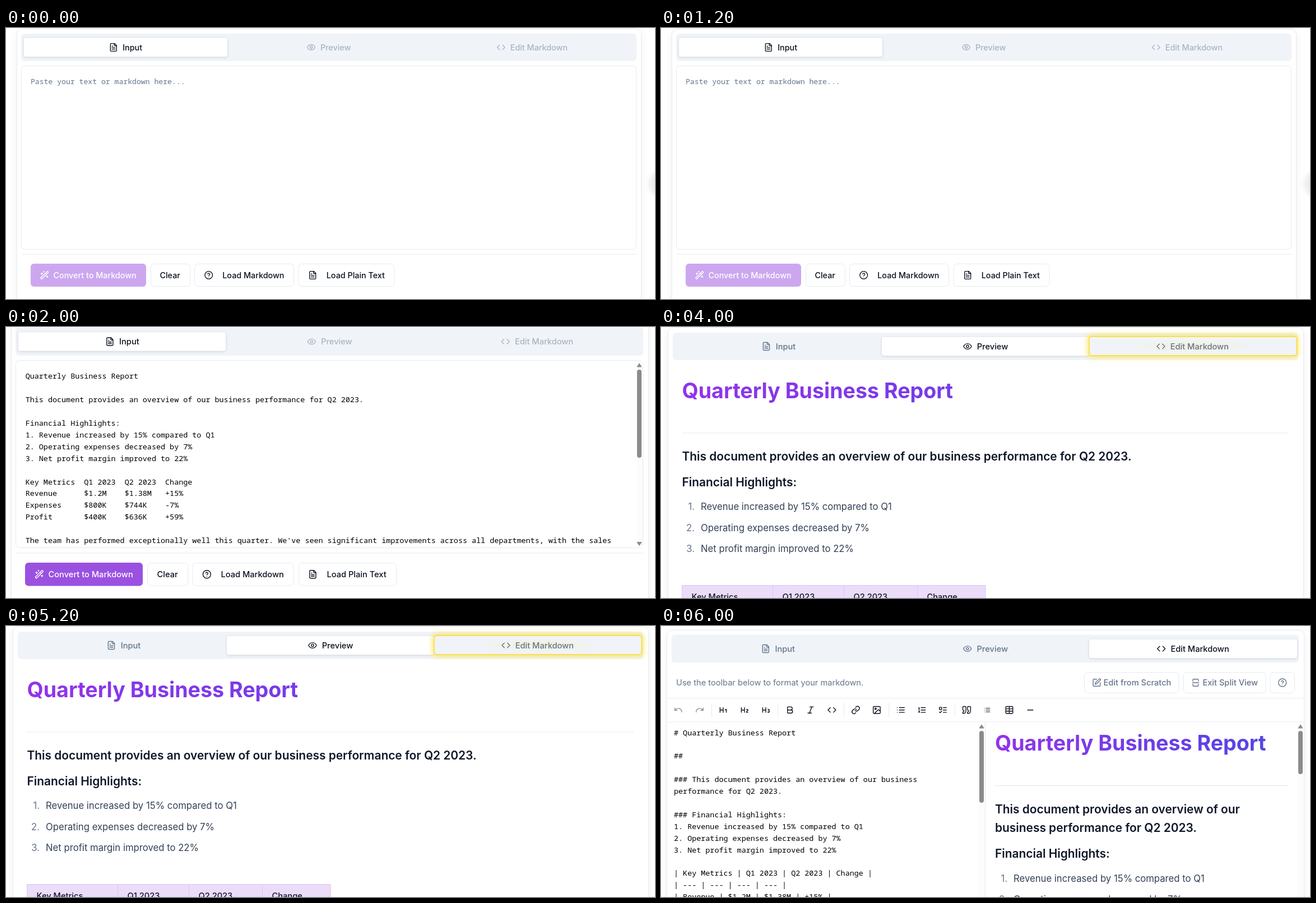
Write an HTML page that moves like this. It is 1158x483 px and loops after 8000 ms.

```html
<!DOCTYPE html>
<html lang="en">
<head>
<meta charset="utf-8">
<title>Markdown converter</title>
<style>
  html, body { margin: 0; width: 100%; height: 100%; overflow: hidden; background: #fff; }
  svg { display: block; }
  text { font-family: Inter, sans-serif; white-space: pre; }
  .mono { font-family: "Noto Sans Mono", monospace; }
  .icon { fill: none; stroke-width: 2; stroke-linecap: round; stroke-linejoin: round; }
  .card { filter: drop-shadow(0 4px 6px rgba(30, 41, 59, .07)); }
  .lift { filter: drop-shadow(0 1.5px 2px rgba(15, 23, 42, .16)); }
</style>
</head>
<body>
<svg id="stage" width="1158" height="483" viewBox="0 0 1158 483"></svg>
<script>
const INK = '#0b1120', HEAD = '#0f172a', BODY = '#334155', MUTED = '#64748b', LINE = '#e6ebf1', BAR = '#f0f4f9';

const circle = (x, y, r) => `M${x - r} ${y}a${r} ${r} 0 1 0 ${2 * r} 0a${r} ${r} 0 1 0 ${-2 * r} 0`;
const frame = 'M5 3h14a2 2 0 0 1 2 2v14a2 2 0 0 1-2 2H5a2 2 0 0 1-2-2V5a2 2 0 0 1 2-2z';
const ICONS = {
  file: 'M15 2H6a2 2 0 0 0-2 2v16a2 2 0 0 0 2 2h12a2 2 0 0 0 2-2V7zM14 2v4a2 2 0 0 0 2 2h4M10 9H8M16 13H8M16 17H8',
  eye: 'M2 12s3-7 10-7 10 7 10 7-3 7-10 7-10-7-10-7z' + circle(12, 12, 3),
  code: 'M16 18l6-6-6-6M8 6l-6 6 6 6',
  wand: 'M21.6 3.6l-1.2-1.2a1.2 1.2 0 0 0-1.8 0L2.4 18.6a1.2 1.2 0 0 0 0 1.8l1.2 1.2a1.2 1.2 0 0 0 1.8 0L21.6 5.4a1.2 1.2 0 0 0 0-1.8M14 7l3 3M5 6v4M19 14v4M10 2v2M7 8H3M21 16h-4M11 3H9',
  help: circle(12, 12, 10) + 'M9.1 9a3 3 0 0 1 5.8 1c0 2-3 3-3 3M12 17h.01',
  pen: 'M12 3H5a2 2 0 0 0-2 2v14a2 2 0 0 0 2 2h14a2 2 0 0 0 2-2v-7M18.4 2.6a1 1 0 0 1 3 3l-9 9a2 2 0 0 1-.9.5l-2.9.9a.5.5 0 0 1-.6-.6l.9-2.9a2 2 0 0 1 .5-.9z',
  split: 'M5 8V5c0-1 1-2 2-2h10c1 0 2 1 2 2v3M19 16v3c0 1-1 2-2 2H7c-1 0-2-1-2-2v-3M4 12h16',
  undo: 'M3 7v6h6M21 17a9 9 0 0 0-9-9 9 9 0 0 0-6 2.3L3 13',
  redo: 'M21 7v6h-6M3 17a9 9 0 0 1 9-9 9 9 0 0 1 6 2.3l3 2.7',
  h1: 'M4 12h8M4 18V6M12 18V6M17 12l3-2v8',
  h2: 'M4 12h8M4 18V6M12 18V6M21 18h-4c0-4 4-3 4-6 0-1.5-2-2.5-4-1',
  h3: 'M4 12h8M4 18V6M12 18V6M17.5 10.5c1.7-1 3.5 0 3.5 1.5a2 2 0 0 1-2 2M17 17.5c2 1.5 4 .3 4-1.5a2 2 0 0 0-2-2',
  bold: 'M6 12h9a4 4 0 0 1 0 8H7a1 1 0 0 1-1-1V5a1 1 0 0 1 1-1h7a4 4 0 0 1 0 8',
  italic: 'M19 4h-9M14 20H5M15 4L9 20',
  link: 'M10 13a5 5 0 0 0 7.5.5l3-3a5 5 0 0 0-7-7l-1.8 1.7M14 11a5 5 0 0 0-7.5-.5l-3 3a5 5 0 0 0 7 7l1.8-1.7',
  image: frame + circle(9, 9, 2) + 'M21 15l-3-3a2 2 0 0 0-3 0L6 21',
  list: 'M8 6h13M8 12h13M8 18h13M3 6h.01M3 12h.01M3 18h.01',
  ordered: 'M10 6h11M10 12h11M10 18h11M4 6h1v4M4 10h2M6 18H4c0-1 2-2 2-3s-1-1.5-2-1',
  todo: 'M4 5h4a1 1 0 0 1 1 1v4a1 1 0 0 1-1 1H4a1 1 0 0 1-1-1V6a1 1 0 0 1 1-1zM3 17l2 2 4-4M13 6h8M13 12h8M13 18h8',
  quote: [0, 12].map(x => `M${3 + x} 21c3 0 7-1 7-8V5c0-1.2-.8-2-2-2h-4c-1.2 0-2 .8-2 2v6c0 1.2.8 2 2 2 1 0 1 0 1 1v1c0 1-1 2-2 2s-1 0-1 1v2c0 1 0 1 1 1z`).join(''),
  table: frame + 'M12 3v18M3 9h18M3 15h18',
  minus: 'M5 12h14'
};

const rect = (x, y, x2, y2, fill, r = 0, more = '') =>
  `<rect x="${x}" y="${y}" width="${x2 - x}" height="${y2 - y}" rx="${r}" fill="${fill}" ${more}/>`;
const box = (x, y, x2, y2, r = 6) => rect(x, y, x2, y2, '#fff', r, `stroke="${LINE}"`);
const rule = (x, x2, y, color = LINE) => rect(x, y, x2, y + 1, color);
const text = (s, x, y, size, weight = 400, fill = INK, more = '') =>
  `<text x="${x}" y="${y}" font-size="${size}" font-weight="${weight}" fill="${fill}" ${more}>${s}</text>`;
const icon = (name, x, cy, size, color = INK) =>
  `<path class="icon" d="${ICONS[name]}" stroke="${color}" transform="translate(${x} ${cy - size / 2}) scale(${size / 24})"/>`;
const mono = (lines, x, y, color = '#000', size = 13.41) =>
  lines.map((s, i) => text(s, x, y + i * 20.9, size, 400, color, 'class="mono"')).join('');
const label = (name, s, x, cy, k, color, gap = 24, weight = 500) =>
  icon(name, x, cy, 16 * k, color) + text(s, x + gap * k, cy + 5.1 * k, 14 * k, weight, color);
const card = (x, y, x2) => rect(x, y, x2, 520, '#fff', 10, `class="card" stroke="${LINE}"`);

// Tab strip: xs are the icon positions, lit is the active tab, [a, b] its extent.
function tabs(x, x2, y, y2, xs, lit, a, b, k, dim = 1, under = '') {
  const names = [['file', 'Input'], ['eye', 'Preview'], ['code', 'Edit Markdown']];
  const cy = (y + y2) / 2;
  return rect(x, y, x2, y2, BAR, 6) + rect(a, cy - 16.7, b, cy + 16.7, '#fff', 4, 'class="lift"') + under +
    names.map(([n, s], i) =>
      `<g opacity="${i === lit ? 1 : dim}">${label(n, s, xs[i], cy, k, i === lit ? INK : MUTED)}</g>`).join('');
}

// Bottom buttons: e holds left/right edges, t the icon or text positions.
function actions(e, t, y, y2, k, fill) {
  const cy = (y + y2) / 2;
  return rect(e[0], y, e[1], y2, fill, 6) + label('wand', 'Convert to Markdown', t[0], cy, k, '#fff', 23.5) +
    [2, 4, 6].map(i => box(e[i], y + .5, e[i + 1], y2 - .5)).join('') +
    text('Clear', t[1], cy + 5.1 * k, 14 * k, 500) +
    label('help', 'Load Markdown', t[2], cy, k, INK, 32) + label('file', 'Load Plain Text', t[3], cy, k, INK, 32);
}

const arrow = (x, y, d) => `<path d="M${x - 4} ${y + 3 * d}h8L${x} ${y - 3 * d}z" fill="#8b8b8b" stroke="#8b8b8b" stroke-linejoin="round"/>`;
const thumb = (x, y, y2) => rect(x - 4, y, x + 4, y2, '#8b8b8b', 4);

const facts = ['Revenue increased by 15% compared to Q1', 'Operating expenses decreased by 7%', 'Net profit margin improved to 22%'];
const numbered = facts.map((s, i) => `${i + 1}. ${s}`);
const intro = 'This document provides an overview of our business performance for Q2 2023.';
const table = [
  ['Key Metrics', 'Q1 2023', 'Q2 2023', 'Change'], ['Revenue', '$1.2M', '$1.38M', '+15%'],
  ['Expenses', '$800K', '$744K', '-7%'], ['Profit', '$400K', '$636K', '+59%']
];
const columns = row => row.map((s, i) => s.padEnd(i ? 9 : 13)).join('');
const pipes = row => `| ${row.join(' | ')} |`;

const title = (x, x2, y) =>
  `<linearGradient id="g${x}" gradientUnits="userSpaceOnUse" x1="${x}" x2="${x2}"><stop stop-color="#9333ea"/><stop offset="1" stop-color="#4f46e5"/></linearGradient>` +
  text('Quarterly Business Report', x, y, 37.6, 700, `url(#g${x})`);
const heading = (s, x, y) => text(s, x, y, 20.9, 600, HEAD);
const bullets = (x, y) => facts.map((s, i) =>
  text(i + 1 + '.', x - 11, y + i * 37.4, 16.7, 400, MUTED, 'text-anchor="end"') +
  text(s, x, y + i * 37.4, 16.7, 400, BODY)).join('');

function emptyInput() {
  return '<ellipse cx="1161" cy="278" rx="14" ry="20" fill="#000" opacity=".07" filter="url(#soft)"/>' +
    card(19.5, 1.5, 1133.5) +
    tabs(27, 1125, 10, 59, [183.6, 536.3, 875.2], 0, 32, 395, 1.024, .5) +
    box(27.5, 67.5, 1124.5, 394.5) +
    mono(['Paste your text or markdown here...'], 44, 99.5, MUTED, 13.14) +
    rule(28, 1125, 403) +
    actions([44, 250, 258.5, 328.5, 336.5, 513.5, 522, 693], [60.5, 274.5, 353.5, 539], 420, 461, 1.024, '#cca7f0');
}

function filledInput() {
  return card(9.5, -20, 1146.5) +
    tabs(17, 1137, 1, 51, [177, 537, 882.8], 0, 22, 392, 1.045, .5) +
    box(17.5, 59.5, 1136.5, 393.5) + rect(1125, 61, 1136, 392, '#fcfcfc') +
    mono(['Quarterly Business Report', '', intro, '', 'Financial Highlights:', ...numbered, '', ...table.map(columns), '',
      "The team has performed exceptionally well this quarter. We've seen significant improvements across all departments, with the sales"], 34.7, 92.4) +
    arrow(1130, 68, 1) + thumb(1130, 76, 233) + arrow(1130, 386.5, -1) +
    rule(18, 1137, 402.5) +
    actions([34, 244, 252.5, 324.5, 333, 513, 522.5, 696.5], [51, 269.5, 350, 539], 420, 461.5, 1.045, '#9a51e0');
}

function preview() {
  const glow = rect(761, 14, 1137, 54, '#fde047', 6, 'filter="url(#soft)" opacity=".85"') +
    rect(764, 17, 1134, 51, BAR, 4) + rect(764, 17, 1134, 51, 'url(#sheen)', 4, 'stroke="#fbdf4e" stroke-width="1.8"');
  const edges = [37.5, 199.5, 326.5, 457.5, 579];
  return card(12.5, .5, 1146.5) +
    tabs(21, 1137, 10, 59, [179.6, 538.6, 883.6], 1, 394, 764, 1.045, 1, glow) +
    title(37.5, 1120, 127) + rule(37, 1120, 188.5) +
    heading(intro, 37.5, 238) + heading('Financial Highlights:', 37.5, 284) + bullets(71, 326.3) +
    table[0].map((s, i) => rect(edges[i], 460.5, edges[i + 1], 500, '#ebdcf9', 0, 'stroke="#dcc6f5"') +
      text(s, edges[i] + 17, 486, 14.63, 500, HEAD)).join('');
}

function editor() {
  const tools = { undo: 31, redo: 69, h1: 111, h2: 149, h3: 187, bold: 230, italic: 267, code: 305, link: 347.5, image: 385,
    list: 428, ordered: 465.5, todo: 503, quote: 545.5, table: 621.5, minus: 659 };
  const source = ['# Quarterly Business Report', '', '##', '', '### This document provides an overview of our business',
    'performance for Q2 2023.', '', '### Financial Highlights:', ...numbered, '',
    pipes(table[0]), pipes(Array(4).fill('---')), pipes(table[1])];
  return card(10.5, 7.5, 1147.5) +
    tabs(19, 1138, 15.5, 65.5, [178.4, 538.4, 884.3], 2, 764, 1135, 1.045) +
    text('Use the toolbar below to format your markdown.', 27, 106, 14.63, 400, MUTED) +
    box(755.5, 82.5, 924, 119.5) + label('pen', 'Edit from Scratch', 769, 101, 1.045, MUTED, 19.6) +
    box(932.5, 82.5, 1079, 119.5) + label('split', 'Exit Split View', 945.5, 101, 1.045, MUTED, 20) +
    box(1087, 82.5, 1130.5, 119.5) + icon('help', 1100.4, 101, 16.7, MUTED) +
    rule(11, 1147, 128) + rule(11, 1147, 170.5) +
    [90, 208, 326, 406, 524].map(x => rect(x, 137, x + 1, 162, LINE)).join('') +
    Object.entries(tools).map(([n, x]) => icon(n, x - 8.4, 149.7, 16.7, /do$/.test(n) && n !== 'todo' ? '#858890' : INK)).join('') +
    icon('list', 575.5, 149.7, 13) +
    mono(source, 23, 194.6) +
    rect(566, 171, 578, 483, '#fcfcfc') + rect(578, 171, 579, 483, LINE) +
    arrow(572, 179, 1) + thumb(572, 187, 315) +
    title(596, 1118, 222) + rule(596, 1118, 284, '#e4e4f3') +
    heading('This document provides an overview of our', 596, 333.7) + heading('business performance for Q2 2023.', 596, 367) +
    heading('Financial Highlights:', 596, 413) + bullets(629, 455.7) +
    rect(1135, 171, 1147, 483, '#fcfcfc') + arrow(1141, 179, 1) + thumb(1141, 187, 264);
}

const scenes = [emptyInput, filledInput, preview, editor];
const stage = document.getElementById('stage');
stage.innerHTML = `<defs>
  <filter id="soft" x="-50%" y="-100%" width="200%" height="300%"><feGaussianBlur stdDeviation="5"/></filter>
  <radialGradient id="sheen"><stop stop-color="#fde047" stop-opacity=".2"/><stop offset=".65" stop-color="#fde047" stop-opacity="0"/></radialGradient>
</defs>` + scenes.map(draw => `<g>${draw()}</g>`).join('');
const groups = [...stage.querySelectorAll(':scope > g')];

const start = performance.now();
function tick() {
  const now = Math.floor((performance.now() - start) / 2000) % scenes.length;
  groups.forEach((g, i) => g.setAttribute('display', i === now ? 'inline' : 'none'));
  requestAnimationFrame(tick);
}
tick();
</script>
</body>
</html>
```
